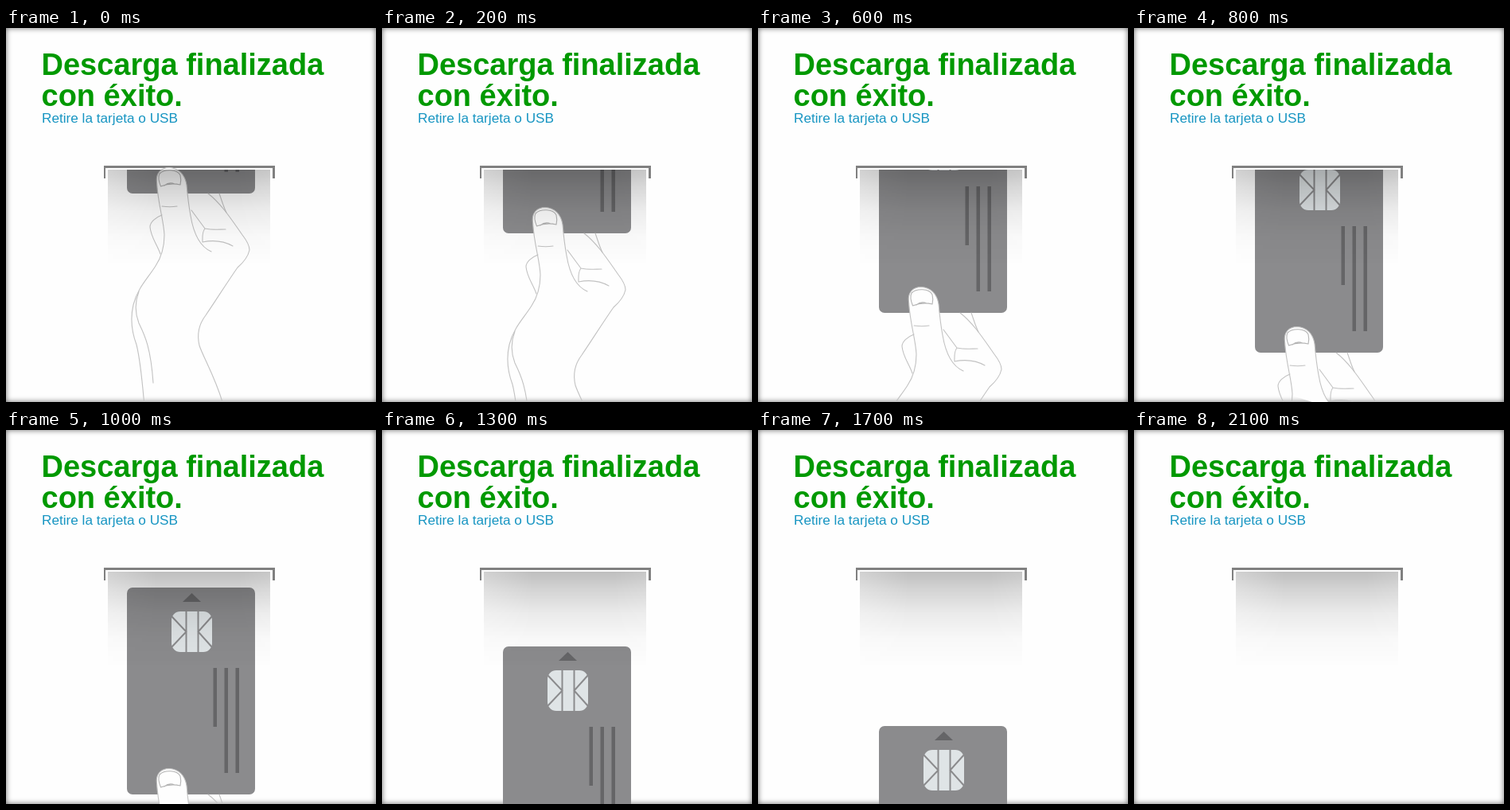
Recreate the animation shown at these times as an HTML page. Size 465 by 470 pixels, loop 2200 ms.

```html
<!DOCTYPE html>
<html lang="es">
<head>
<meta charset="utf-8">
<title>Descarga finalizada</title>
<style>
  html, body { margin: 0; width: 100%; height: 100%; overflow: hidden; background: #fefefe; }
  .stage { position: relative; width: 465px; height: 470px; overflow: hidden; box-shadow: inset 0 0 7px rgba(0, 0, 0, .6); }
  svg { position: absolute; left: 0; top: 0; display: block; }
  text { font-family: "Liberation Sans", Arial, sans-serif; }
  .title { font-size: 38px; font-weight: bold; fill: #090; }
  .hint { font-size: 17.2px; fill: #1795c2; }
  .slide { animation: eject 2200ms infinite; }
  .lines { fill: none; stroke: #c2c2c2; stroke-width: 1.1; stroke-linecap: round; stroke-linejoin: round; }

  /* 25px every 100ms; the second half sits one pixel higher */
  @keyframes eject {
    0% { transform: translateY(0); animation-timing-function: steps(11, end); }
    49.999% { transform: translateY(275px); animation-timing-function: steps(1, end); }
    50% { transform: translateY(274px); animation-timing-function: steps(11, end); }
    100% { transform: translateY(549px); }
  }
</style>
</head>
<body>
<div class="stage">
<svg width="465" height="470" viewBox="0 0 465 470">
  <defs>
    <clipPath id="opening"><rect x="128" y="178" width="204" height="292"/></clipPath>
    <linearGradient id="shade" x2="0" y2="1">
      <stop offset="0" stop-opacity=".25"/>
      <stop offset=".19" stop-opacity=".165"/>
      <stop offset=".44" stop-opacity=".075"/>
      <stop offset=".7" stop-opacity=".025"/>
      <stop offset="1" stop-opacity="0"/>
    </linearGradient>
    <linearGradient id="sides">
      <stop offset="0" stop-color="#fff" stop-opacity=".72"/>
      <stop offset=".3" stop-color="#fff"/>
      <stop offset=".8" stop-color="#fff"/>
      <stop offset="1" stop-color="#fff" stop-opacity=".88"/>
    </linearGradient>
    <mask id="soft" maskUnits="userSpaceOnUse" x="128" y="178" width="204" height="120">
      <rect x="128" y="178" width="204" height="120" fill="url(#sides)"/>
    </mask>
  </defs>

  <text class="title" x="44.5" y="59">Descarga finalizada</text>
  <text class="title" x="44.5" y="98">con éxito.</text>
  <text class="hint" x="45" y="119">Retire la tarjeta o USB</text>

  <path fill="#808080" d="M123 173H338V189H335V176H125V189H123Z"/>

  <g clip-path="url(#opening)">
    <g class="slide">
      <g transform="translate(0 -52)">
        <rect x="152" width="161" height="260" rx="7" fill="#8b8b8d"/>
        <path fill="#656567" d="M233.500 7L245 18H222Z"/>
        <rect x="208" y="30" width="51" height="51" rx="11" fill="#dfe4e6"/>
        <path fill="none" stroke="#8b8b8d" stroke-width="2"
          d="M226.500 30V81M241.500 30V81M208 36L226.500 55.500L208 75M259 36L241.500 55.500L259 75"/>
        <path fill="#656567" d="M260.500 101h4.500v74h-4.500zM274.500 101h4.500v132h-4.500zM288.500 101h4.500v132h-4.500z"/>
      </g>
    </g>
  </g>

  <g class="slide">
    <!-- thumb -->
    <path fill="#fefefe" d="M199 262C199 240 191 222 189.500 194C188 182 195 175.500 205 175.500C217 176 225 184 227 197C228 208 229 220 232 236C236 260 244 275 258 281Z"/>
    <g class="lines">
      <path d="M173.500 470C171 442 169 418 164 398C158 382 156 365 160 348C165 327 178 315 188 299C196 287 199 275 199 260C198 240 191 222 189.500 194C188 182 195 175.500 205 175.500C217 176 225 184 227 197C228 208 229 220 232 236C236 260 244 275 258 281"/>
      <path d="M196 235C188 238 181 244 181 250C182 263 190 272 194 284"/>
      <path d="M167 331C162 344 162 358 167 371C175 387 182 403 185 446"/>
      <path d="M254 208C271 221 285 243 297 260C304 269 306 274 306 279C304 288 298 295 291 301C277 321 264 342 251 361C241 374 240 386 243 399C248 414 262 437 272 470"/>
      <path d="M268 208C271 216 273 224 277 232"/>
      <path d="M233 229L250 252C260 254 268 253 276 253M250 252C246 257 247 263 247 269C262 266 276 269 285 274"/>
      <path d="M196 224Q206 225.500 215 224"/>
      <path stroke="#b4b4b4" d="M194.500 199C192 193 191 187 193 183C199 177 215 177 219 185C220 189 220 193 219 197C211 195 202 196 194.500 199ZM199 198Q205 193 212 196"/>
    </g>
  </g>

  <rect x="128" y="178" width="204" height="120" fill="url(#shade)" mask="url(#soft)"/>
</svg>
</div>
</body>
</html>
```
